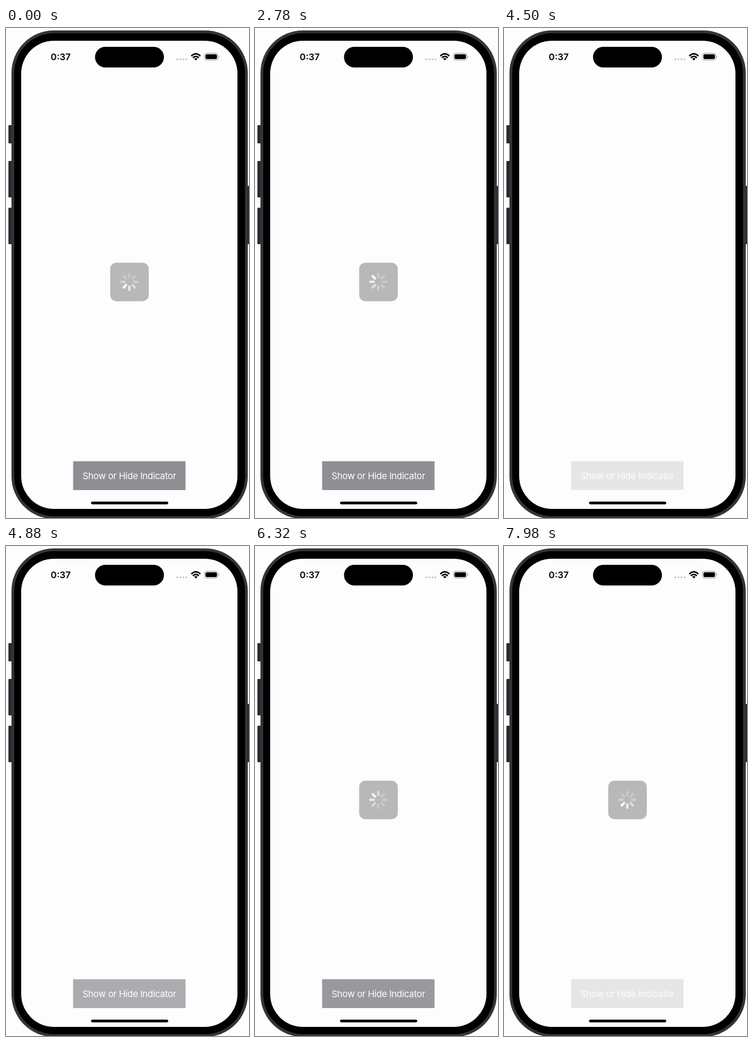
An HTML page that plays this animation: 400 px wide and 807 px high, repeating every 8000 ms.

```html
<!DOCTYPE html>
<html lang="en">
<head>
<meta charset="utf-8">
<title>Activity indicator</title>
<style>
  html, body { margin: 0; width: 100%; height: 100%; overflow: hidden; background: #fdfdfe; }
  svg { display: block; width: 400px; height: 807px; }
  text { font-family: Inter, Roboto, sans-serif; text-anchor: middle; }
  .time { font-size: 15px; font-weight: 600; }
  .label { font-size: 15px; letter-spacing: -.35px; fill: #fff; }
</style>
</head>
<body>
<svg viewBox="0 0 400 807">
  <g fill="#2a2a2f">
    <rect x="4" y="160" width="7" height="30" rx="1"/>
    <rect x="4" y="219" width="7" height="60" rx="1"/>
    <rect x="4" y="296" width="7" height="60" rx="1"/>
    <rect x="396" y="260" width="6" height="96" rx="1"/>
  </g>
  <rect x="9" y="4" width="389" height="804.5" rx="70" fill="#34343a"/>
  <rect x="13.5" y="8.5" width="380" height="795.5" rx="66"/>
  <rect x="25" y="21" width="356" height="771" rx="54" fill="#fdfdfe"/>

  <text class="time" x="90" y="53">0:37</text>
  <rect x="146.5" y="31" width="113.5" height="34" rx="17"/>
  <g fill="#c6c6c8">
    <circle cx="282" cy="51.5" r="1.6"/><circle cx="287" cy="51.5" r="1.6"/>
    <circle cx="292" cy="51.5" r="1.6"/><circle cx="297" cy="51.5" r="1.6"/>
  </g>
  <g fill="none" stroke="#000" stroke-width="2.4">
    <path d="M305 46.2Q312.5 38.8 320 46.2"/>
    <path d="M307.6 49Q312.500 44.5 317.4 49"/>
  </g>
  <path d="M309.8 50.6Q312.5 48.6 315.2 50.6L312.5 53.5Z"/>
  <rect x="326.5" y="41.5" width="22.5" height="11.5" rx="3.6" fill="none" stroke="#a3a3a6"/>
  <rect x="328.3" y="43.3" width="19" height="8" rx="2.2"/>
  <path d="M350.3 45.3Q352.3 47.3 350.3 49.3Z" fill="#a3a3a6"/>

  <g id="indicator">
    <rect x="171.5" y="386.5" width="63.5" height="63.5" rx="10" fill="#b8b8b9"/>
    <g id="spokes" transform="translate(203 418)" stroke="#fcfcff" stroke-width="3.8" stroke-linecap="round"></g>
  </g>

  <g id="button">
    <rect x="110.5" y="713.5" width="185" height="47.5" fill="#8e8e93"/>
    <text class="label" x="203" y="743">Show or Hide Indicator</text>
  </g>
  <rect x="140" y="780" width="127" height="4.5" rx="2.25"/>
</svg>
<script>
const LOOP = 8000;
const HIDE = 97, SHOW = 125;      // ticks at which the indicator toggles
const TICKS_PER_SPOKE = 6;
const DIM = .2, DOWN_TICKS = 2, UP_TICKS = 20;
const TAPS = [{ down: 92, up: 98 }, { down: 119, up: 126 }, { down: 168, up: 180 }];

const $ = id => document.getElementById(id);
const clamp = x => Math.min(1, Math.max(0, x));
const mix = (a, b, k) => a + (b - a) * clamp(k);
const easeOut = k => 1 - (1 - clamp(k)) ** 3;

// Three ticks per 140 ms, the middle one held for 100 ms.
function tickAt(ms) {
  const rest = ms % 140;
  return 3 * Math.floor(ms / 140) + (rest < 20 ? 0 : rest < 120 ? 1 : 2);
}

// Position of the brightest spoke, clockwise from the top; restarts when shown again.
function headAt(tick) {
  return tick < SHOW ? 5.2 + tick / TICKS_PER_SPOKE : 5.5 + (tick - SHOW) / TICKS_PER_SPOKE;
}

// Lights up within one spoke's time, then fades over the next three and a half.
function spokeOpacity(age) {
  return age > 7 ? mix(.25, 1, age - 7) : mix(1, .25, age / 3.5);
}

function buttonOpacity(tick) {
  const tap = TAPS.filter(t => tick >= t.down).pop();
  if (!tap) return 1;
  return tick < tap.up
    ? mix(1, DIM, (tick - tap.down) / DOWN_TICKS)
    : mix(DIM, 1, easeOut((tick - tap.up) / UP_TICKS));
}

const spokes = Array.from({ length: 8 }, (_, i) => {
  const line = document.createElementNS("http://www.w3.org/2000/svg", "line");
  line.setAttribute("y1", -7.6);
  line.setAttribute("y2", -13.2);
  line.setAttribute("transform", `rotate(${i * 45})`);
  return $("spokes").appendChild(line);
});

function draw(ms) {
  const tick = tickAt(ms), head = headAt(tick);
  $("indicator").style.display = tick >= HIDE && tick < SHOW ? "none" : "";
  spokes.forEach((spoke, i) => spoke.setAttribute("opacity", spokeOpacity((head - i + 8) % 8)));
  $("button").setAttribute("opacity", buttonOpacity(tick));
}

function loop() {
  draw(performance.now() % LOOP);
  requestAnimationFrame(loop);
}
loop();
</script>
</body>
</html>
```
